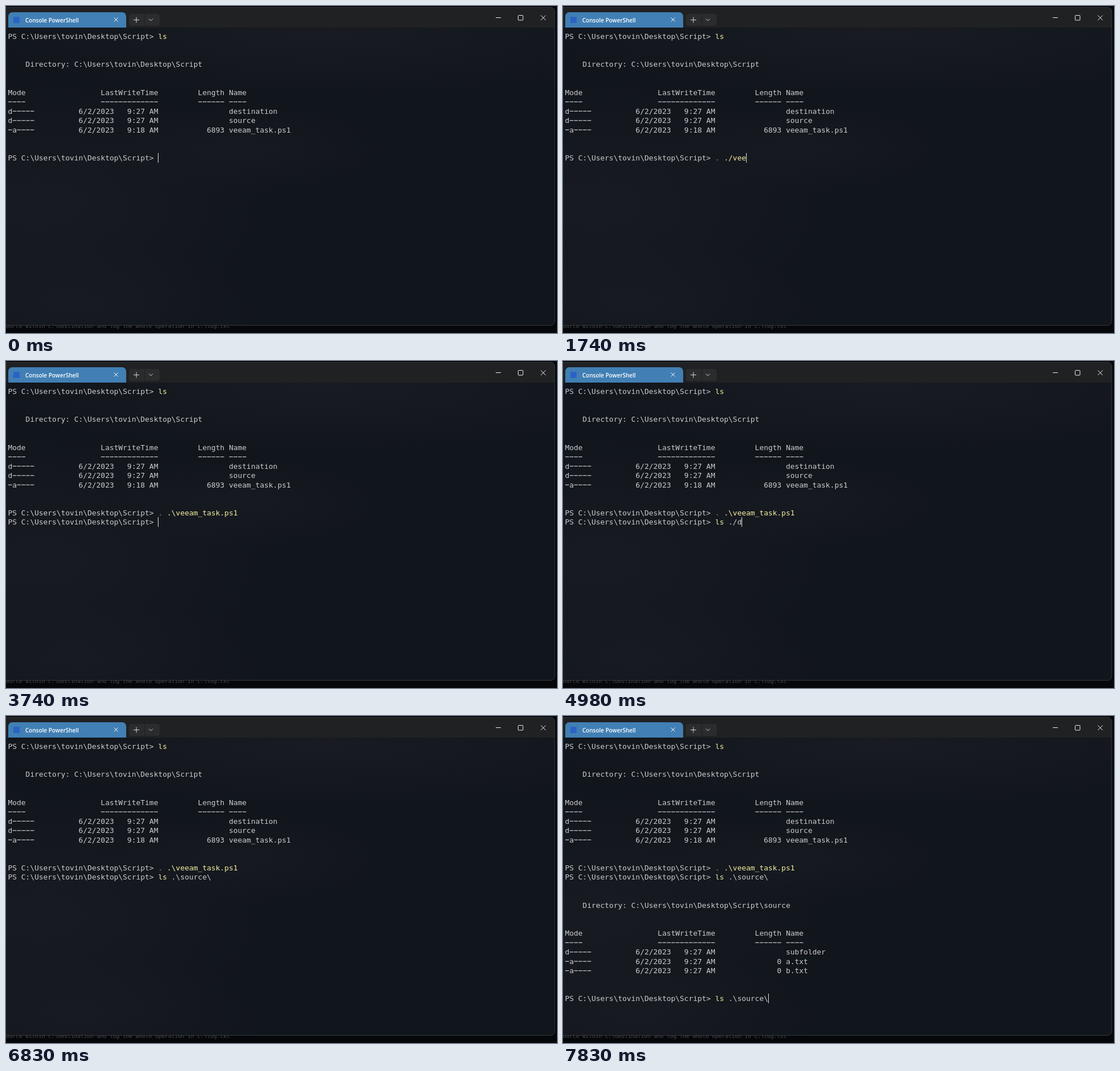
Write an HTML page with a canvas that moves like this. It is 972 px wide and 576 px high and loops after 8 s.

```html
<!DOCTYPE html>
<html lang="en">
<head>
<meta charset="utf-8">
<title>Terminal session</title>
<style>
  html, body { margin: 0; width: 100%; height: 100%; overflow: hidden; background: #05070b; }
  canvas { display: block; width: 972px; height: 576px; }
</style>
</head>
<body>
<canvas id="stage" width="972" height="576"></canvas>
<script>
const ctx = document.getElementById('stage').getContext('2d');
const LOOP = 8000;
const CELL_W = 7.795, CELL_H = 16.46, LEFT = 3.4, TOP = 45.4;
const MONO = '"DejaVu Sans Mono", monospace';
const TEXT = '#cccccc', YELLOW = '#f5eea0', GREY = '#858585', RED = '#e74856';
const HOME = 'C:\\Users\\tovin\\Desktop\\Script';
const PROMPT = `PS ${HOME}> `;
const SCRIPT_CALL = '. .\\veeam_task.ps1', LIST_SOURCE = 'ls .\\source\\';

// Each step: start time, row of the active prompt, typed command, cursor visible
const steps = [
  [0, 13, '', true],
  [500, 13, '', false],
  [620, 13, '.', true],
  [740, 13, '. ', true],
  [990, 13, '. .', true],
  [1240, 13, '. ./', true],
  [1490, 13, '. ./ve', true],
  [1740, 13, '. ./vee', true],
  [1860, 13, SCRIPT_CALL, true],
  [2490, 13, SCRIPT_CALL, false],
  [2610, 14, '', true],
  [3120, 14, '', false],
  [3740, 14, '', true],
  [3990, 14, 'l', true],
  [4110, 14, 'ls ', true],
  [4480, 14, 'ls .', true],
  [4730, 14, 'ls ./', true],
  [4980, 14, 'ls ./d', true],
  [5100, 14, 'ls ./de', true],
  [5220, 14, 'ls ./des', true],
  [5590, 14, 'ls ./de', true],
  [5710, 14, 'ls ./d', true],
  [5850, 14, 'ls ./', true],
  [5970, 14, 'ls ./s', true],
  [6090, 14, 'ls ./so', true],
  [6210, 14, 'ls ./sou', true],
  [6330, 14, LIST_SOURCE, true],
  [6830, 14, LIST_SOURCE, false],
  [7330, 27, '', true],
  [7830, 27, LIST_SOURCE, true],
];

function box(x, y, w, h, color, radius = 0) {
  ctx.fillStyle = color;
  ctx.beginPath();
  ctx.roundRect(x, y, w, h, radius);
  ctx.fill();
}

function lines(color, width, ...paths) {
  ctx.strokeStyle = color;
  ctx.lineWidth = width;
  ctx.beginPath();
  for (const [x, y, ...rest] of paths) {
    ctx.moveTo(x, y);
    for (let i = 0; i < rest.length; i += 2) ctx.lineTo(rest[i], rest[i + 1]);
  }
  ctx.stroke();
}

function glow(x, y, rx, ry, color) {
  ctx.save();
  ctx.translate(x, y);
  ctx.scale(rx, ry);
  const fade = ctx.createRadialGradient(0, 0, 0, 0, 0, 1);
  fade.addColorStop(0, color);
  fade.addColorStop(1, 'rgba(30,33,39,0)');
  ctx.fillStyle = fade;
  ctx.fillRect(-1, -1, 2, 2);
  ctx.restore();
}

// Places characters on the terminal grid; hyphens nearly fill their cell
function print(row, col, text, color = TEXT) {
  ctx.font = '12.95px ' + MONO;
  ctx.fillStyle = color;
  const top = TOP + row * CELL_H;
  [...text].forEach((char, i) => {
    const x = LEFT + (col + i) * CELL_W;
    if (char === '-') ctx.fillRect(x + 0.6, top + 7.6, 6.6, 1.2);
    else if (char !== ' ') ctx.fillText(char, x, top + 12.6);
  });
}

function drawWindow() {
  box(0, 0, 972, 576, '#05070b');
  ctx.font = '9.5px ' + MONO;
  ctx.fillStyle = '#4b4d50';
  ctx.fillText('ource within c:\\destination and log the whole operation in c:\\log.txt', 0, 567);

  ctx.save();
  ctx.beginPath();
  ctx.roundRect(-10, 2, 978, 560.5, 7);
  ctx.clip();
  box(0, 0, 972, 576, '#11151c');
  glow(560, 50, 640, 110, 'rgba(30,33,39,.55)');
  glow(60, 350, 420, 230, 'rgba(30,33,39,.5)');
  glow(430, 250, 240, 80, 'rgba(30,33,39,.4)');
  glow(130, 530, 330, 110, 'rgba(30,33,39,.4)');
  box(0, 2, 972, 36, '#202123');
  ctx.restore();
  ctx.strokeStyle = '#36383b';
  ctx.lineWidth = 1;
  ctx.beginPath();
  ctx.roundRect(-10, 2.5, 978, 560, 7);
  ctx.stroke();

  box(4, 11, 208, 27, '#417fb4', [7, 7, 0, 0]);
  box(13, 19, 11, 11, '#2b63c4');
  ctx.font = '600 10px "Open Sans", sans-serif';
  ctx.fillStyle = '#fff';
  ctx.fillText('Console PowerShell', 34, 28.5);
  lines('#f2f6fa', 1, [190.5, 20.5, 197.5, 27.5], [197.5, 20.5, 190.5, 27.5]);

  box(217, 14, 54, 21, '#2b2c2e', 4);
  lines('#1f2022', 1, [244.5, 14, 244.5, 35]);
  lines('#d8d8d8', 1, [225, 24.5, 235, 24.5], [230, 19.5, 230, 29.5], [252, 22.5, 255.5, 26, 259, 22.5]);

  lines('#f0f0f0', 1, [864, 20.5, 873, 20.5], [943.5, 16.5, 952, 25], [952, 16.5, 943.5, 25]);
  ctx.beginPath();
  ctx.roundRect(903.5, 16.5, 8.5, 8.5, 1);
  ctx.stroke();
}

function printListing(row, folder, entries) {
  const table = (mode, time, size, name) =>
    mode.padEnd(16) + '6/2/2023   ' + time + size.padStart(15) + ' ' + name;
  print(row, 4, 'Directory: ' + folder);
  print(row + 3, 0, 'Mode'.padEnd(21) + 'LastWriteTime         Length Name');
  print(row + 4, 0, '----'.padEnd(21) + '-------------         ------ ----');
  entries.forEach((entry, i) => print(row + 5 + i, 0, table(...entry)));
}

function printPrompt(row, command) {
  print(row, 0, PROMPT);
  if (command.trim() === '.') {
    box(LEFT + 32 * CELL_W, TOP + row * CELL_H + 2, CELL_W, 13, '#13171e');
    print(row, 32, '>', RED);
  }
  const isCall = command.startsWith('.');
  const split = isCall ? 1 : 2;
  const start = PROMPT.length;
  print(row, start, command.slice(0, split), isCall ? GREY : YELLOW);
  print(row, start + split, command.slice(split), isCall ? YELLOW : TEXT);
}

function draw([, row, command, cursorOn]) {
  drawWindow();
  printPrompt(0, 'ls');
  printListing(3, HOME, [
    ['d-----', '9:27 AM', '', 'destination'],
    ['d-----', '9:27 AM', '', 'source'],
    ['-a----', '9:18 AM', '6893', 'veeam_task.ps1'],
  ]);
  if (row > 13) printPrompt(13, SCRIPT_CALL);
  if (row > 14) {
    printPrompt(14, LIST_SOURCE);
    printListing(17, HOME + '\\source', [
      ['d-----', '9:27 AM', '', 'subfolder'],
      ['-a----', '9:27 AM', '0', 'a.txt'],
      ['-a----', '9:27 AM', '0', 'b.txt'],
    ]);
  }
  printPrompt(row, command);
  if (cursorOn) {
    const x = Math.round(LEFT + (PROMPT.length + command.length) * CELL_W);
    box(x, Math.floor(TOP + row * CELL_H), 1, 17, '#e0e0e0');
  }
}

const startTime = performance.now();
let shown;
function tick() {
  const time = (performance.now() - startTime) % LOOP;
  const step = steps.findLast(([from]) => from <= time);
  if (step !== shown) draw(shown = step);
  requestAnimationFrame(tick);
}
tick();
</script>
</body>
</html>
```
